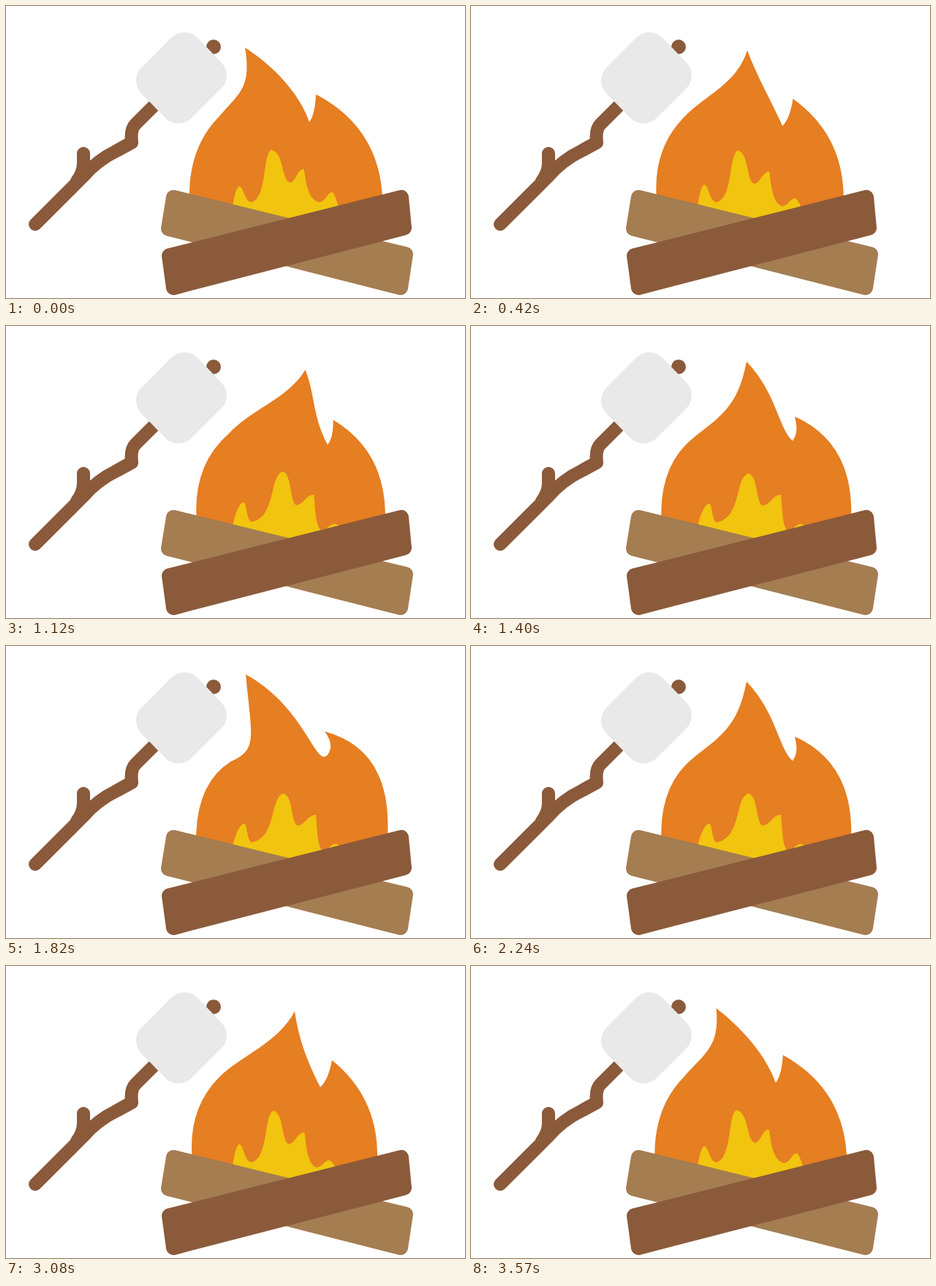
Write an HTML page that moves like this. It is 628 px wide and 400 px high and loops after 3640 ms.

```html
<!DOCTYPE html>
<html lang="en">
<head>
<meta charset="utf-8">
<title>Campfire</title>
<style>
html, body { margin: 0; width: 100%; height: 100%; overflow: hidden; background: #fff; }
svg { display: block; width: 100vw; height: 100vh; stroke-linejoin: round; stroke-linecap: round; }
</style>
</head>
<body>
<svg viewBox="0 0 628 400">
  <circle cx="284" cy="56" r="10" fill="#8b5a3a"/>
  <g fill="none" stroke="#8b5a3a" stroke-width="18">
    <path d="M40 299L105 234Q125 211 152 198L172 187Q170 169 177 162L205 134"/>
    <path d="M106 202V215Q106 228 97 240"/>
  </g>
  <path d="M244 61L277 95L236 136L203 102Z" fill="#e9e9e9" stroke="#e9e9e9" stroke-width="50"/>
  <path id="flame" fill="#e67e22"/>
  <path id="core" fill="#f1c40f"/>
  <path d="M229 262L547 340L540 386L222 305Z" fill="#a47d51" stroke="#a47d51" stroke-width="20"/>
  <path d="M223 342L541 262L545 304L229 386Z" fill="#8b5a3a" stroke="#8b5a3a" stroke-width="20"/>
</svg>
<script>
const LOOP = 3640, STEP = 70;
const times = [0, 560, 910, 1400, 1820];
const flameTimes = [0, 560, 910, 1820];

// Outline poses: left foot, belly, tip, notch, second tip, right foot.
const flamePoses = [
  "251 266 249 195 291 152 320 118 336 112 327 57 366 82 402 120 415 159 423 148 424 121 510 166 515 262",
  "255 266 248 197 291 153 322 122 372 106 395 62 401 104 414 134 430 166 441 156 446 129 509 180 508 262",
  "261 266 254 192 303 145 338 102 400 93 434 71 428 100 417 108 440 167 448 157 451 132 517 181 518 262",
  "260 266 260 188 308 158 345 142 336 124 328 39 409 83 424 168 440 149 450 136 436 117 529 142 522 262"
].map(parse);
const commands = { 0: "M", 2: "Q", 6: "C", 12: "C", 18: "Q", 22: "Q" };
const TIP_Y = 11;

// Peaks and valleys of the inner fire, left to right.
const corePoses = [
  "319 247 336 269 363 197 389 242 407 223 429 269 446 255",
  "319 244 336 269 366 198 387 244 408 228 425 276 442 266",
  "324 240 336 268 378 197 396 245 419 231 430 279 449 271",
  "326 243 336 269 380 202 399 246 424 231 433 280 451 271"
].map(parse);
// How far across each slope its two handles sit.
const slopes = [[0, .4], [.45, .35], [.8, .55], [.7, .5], [.45, .5], [.15, .1], [.5, .6], [.5, .8]];

const flame = document.getElementById("flame");
const core = document.getElementById("core");

function parse(text) {
  return text.split(" ").map(Number);
}

function locate(keys, u) {
  let i = 0;
  while (i < keys.length - 2 && u >= keys[i + 1]) i++;
  return [i, (u - keys[i]) / (keys[i + 1] - keys[i])];
}

function blend(poses, i, k) {
  const next = poses[i + 1] || poses[i];
  return poses[i].map((v, j) => v + (next[j] - v) * k);
}

function flamePath(u) {
  const [i, k] = locate(flameTimes, u);
  const p = blend(flamePoses, i, k);
  if (i === 2) p[TIP_Y] -= 20 * k * (1 - k);
  return p.map((v, j) => (commands[j] || " ") + v.toFixed(2)).join("") +
    "L500 280L390 300L265 280Z";
}

function corePath(u) {
  const p = blend(corePoses, ...locate(times, u));
  p.push(p[12] + 10, 277);
  let x = 310, y = 276, d = `M${x} ${y}`;
  slopes.forEach(([a, b], n) => {
    const dx = p[2 * n] - x, dy = p[2 * n + 1] - y;
    d += `C${x + a * dx} ${y + .1 * dy} ${x + b * dx} ${y + .92 * dy} ${x + dx} ${y + dy}`;
    x += dx;
    y += dy;
  });
  return d + "L440 288L390 300L320 286Z";
}

// The fire sways out and back along the same poses.
function draw(ms) {
  const t = Math.floor((ms % LOOP) / STEP) * STEP;
  const u = Math.min(t, LOOP - t);
  flame.setAttribute("d", flamePath(u));
  core.setAttribute("d", corePath(u));
}

const start = performance.now();
function tick() {
  draw(Math.max(0, performance.now() - start));
  requestAnimationFrame(tick);
}
draw(0);
requestAnimationFrame(tick);
</script>
</body>
</html>
```
